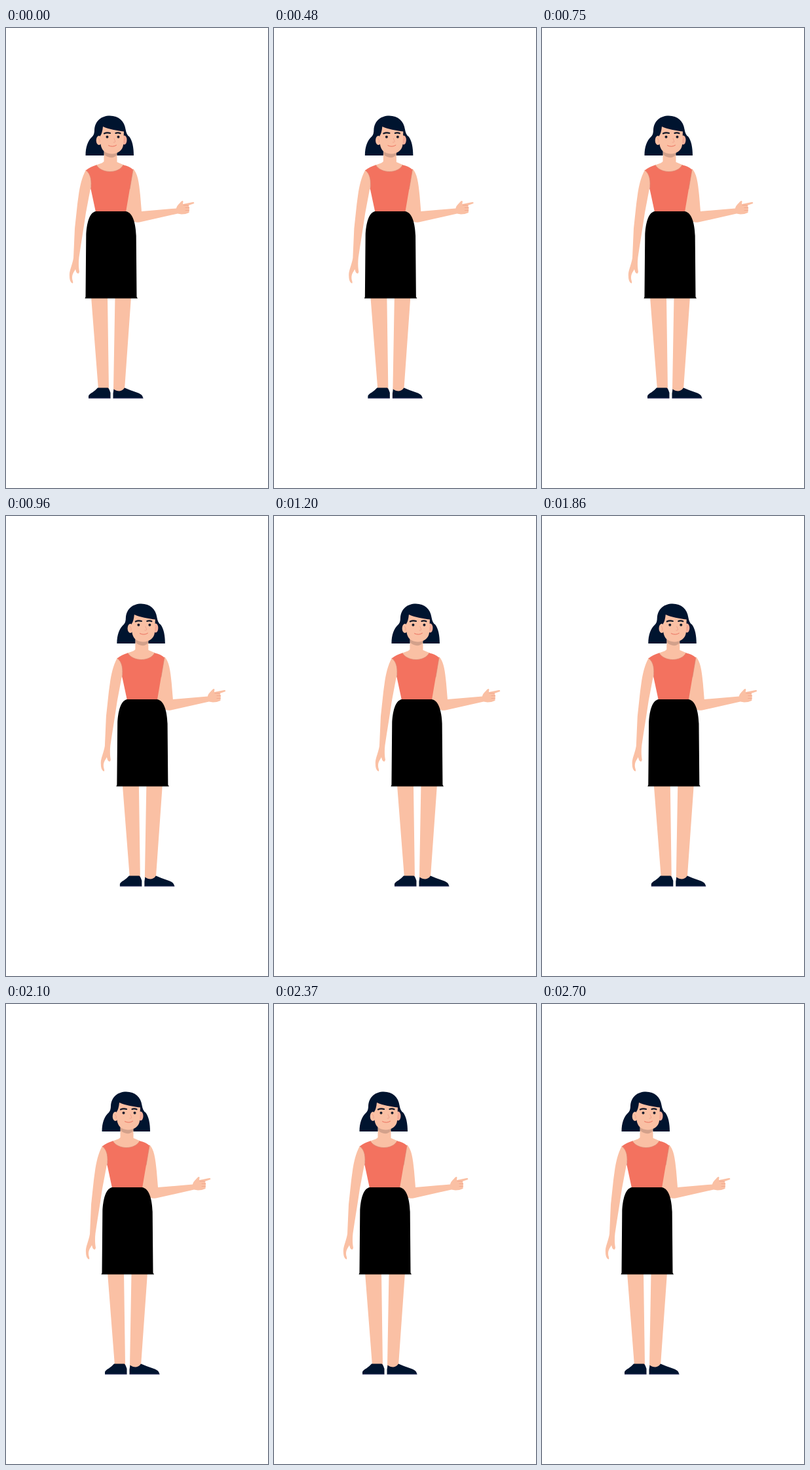
Recreate the animation shown at these times as an HTML page. Size 400 by 700 pixels, loop 2730 ms.

```html
<!DOCTYPE html>
<html lang="en">
<head>
<meta charset="utf-8">
<title>Woman pointing</title>
<style>
  html, body { margin: 0; width: 100%; height: 100%; overflow: hidden; background: #fff; }
  svg { display: block; width: 400px; height: 700px; }
  .skin { fill: #fac0a4; }
  .navy { fill: #00142f; }
  .line { fill: none; stroke-linecap: round; stroke-linejoin: round; }
</style>
</head>
<body>
<svg viewBox="0 0 400 700">
  <g id="woman">
    <!-- legs and shoes -->
    <path class="skin" d="M130 409H155L157 550H141ZM166.500 409H191L181 550L172 554L164 551Z"/>
    <path class="navy" d="M126 563.500V560Q127 557 132 554.500Q137 551 140 547.500H155.500Q157 548 158 551L159.500 555V563.500Z"/>
    <path class="navy" d="M163.500 563.500V556L164.500 549.500Q168 552.500 173 552.500Q178 552 181 547.500Q190 551.500 198 554Q209 557 209.500 563.500Z"/>
    <path class="line" stroke="#39356a" stroke-width=".8" stroke-linecap="butt" d="M126.500 563.200H159M164 563.200H209"/>

    <!-- arms -->
    <path class="skin" d="M122 216C114 231 112 245 109 268L105 305L103 350C101 362 96 370 97 378C97 384 99 388 102 388.500C103 386 101 384 101 380C101 374 104 371 106 367C107 371 108 374 111 373.500L112 371C111 365 110.500 358 111.500 349C115 325 119 302 122 281L129 244L133 226Z"/>
    <path class="skin" d="M194 214C201 221 203 234 205 255L207 279L260 274.500C261 270 264 268 267 264.500Q270 262 270.500 264L270 268L285 265Q288 264.500 287 267L278.500 270L280 273L279.500 281L274 283L268 283.500L262 282.500L204 295.500Q196 297 193 292L182 280L188 236Z"/>
    <path class="line" stroke="#ee9e86" stroke-width=".7" d="M271 269.500L279 270M274 273.500H279.500M274 277.500H279.500"/>

    <!-- neck and top -->
    <path class="skin" d="M149.500 185H169.500V204L180 208.500L174 222H144L138 208.500Q149 205 149.500 203Z"/>
    <path fill="#d3a18b" d="M149.500 187H169.500V193Q165 198 159 197Q153 196 149.500 192Z"/>
    <path fill="#f3725f" d="M122 216.500Q129 211 138 208.500C146 222 172 222 179 208.500Q188 210 194 215.500L183 280H137L129.500 245C131 234 130 222 122 216.500Z"/>
    <path class="line" stroke="#d9826f" stroke-width=".7" d="M122 216.500C130 222 131 234 129.500 245M194 215.500L189 245M138 208.500C146 222 172 222 179 208.500"/>

    <!-- skirt -->
    <path d="M137 279H183C194 281 198 298 198.700 316L199.500 409L201 411.500H120.500L121.500 409L122.300 316C123 298 127 281 137 279Z"/>

    <!-- head -->
    <path class="navy" d="M121.500 194C121.500 181 125 171 132 165Q135 162 135 155C136 141 146 133.500 158.500 133.500C172 133.500 181 142 182.500 154Q184 163 188 165C193 171 195 182 195 194H169.500V186H149.500V194Z"/>
    <ellipse class="skin" cx="142" cy="171" rx="4.300" ry="7"/>
    <ellipse cx="180.500" cy="170.500" rx="4" ry="7" fill="#f7b09b"/>
    <path class="skin" d="M148 150C157 154 169 156 180 157.500L179 178C178 187 169 192 161 191.500C151 191 146 186 144.500 177L144 164Q147 160 148 150Z"/>
    <path class="line" stroke="#ee9d89" stroke-width=".8" d="M141 168Q144 169 143 174M182 168Q179.500 169 180.500 174M165 168L167 173Q166 174.500 164 174"/>
    <path class="line" stroke="#111727" stroke-width="2.200" d="M150 160.500Q154 158.700 159 160M167.500 160Q171 158.700 174.500 160.300"/>
    <circle cx="154.500" cy="165.700" r="2" fill="#171c2b"/>
    <circle cx="171.500" cy="165.700" r="2" fill="#171c2b"/>
    <path class="line" stroke="#ec715f" stroke-width="1" d="M156.500 178.800Q163 182 168.500 178.300"/>
  </g>
</svg>
<script>
  const STEP = 30, LOOP = 2730, HALF = 1350, TRAVEL = 60;
  const woman = document.getElementById('woman');
  const ease = p => p * p * (3 - 2 * p);

  function draw(now) {
    const t = Math.floor((now % LOOP) / STEP) * STEP;
    const p = 1 - Math.abs(t - HALF) / HALF;
    woman.setAttribute('transform', `translate(${TRAVEL * ease(p)} 0)`);
  }

  let start;
  function tick(now) {
    start ??= now;
    draw(now - start);
    requestAnimationFrame(tick);
  }
  draw(0);
  requestAnimationFrame(tick);
</script>
</body>
</html>
```
